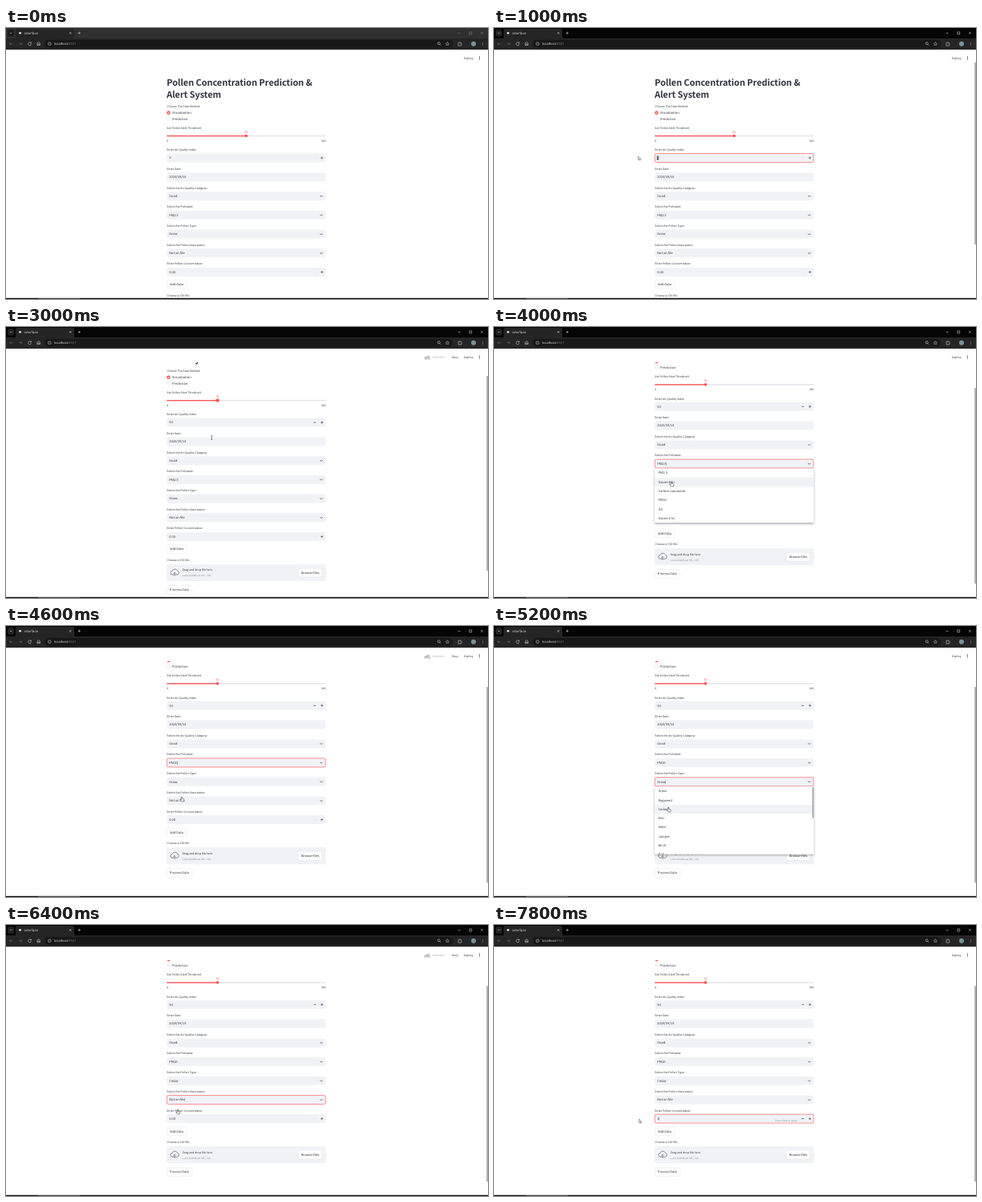
Write an HTML page that moves like this. It is 600 px wide and 338 px high and loops after 8000 ms.

```html
<!DOCTYPE html>
<html lang="en">
<head>
<meta charset="utf-8">
<title>interface</title>
<style>
  html, body { margin: 0; width: 100%; height: 100%; overflow: hidden; background: #fff; }
  svg { display: block; }
  text {
    font-family: "Noto Sans CJK JP", "Noto Sans CJK SC", "Noto Sans CJK", "Open Sans", sans-serif;
    text-rendering: geometricPrecision; white-space: pre;
  }
  .ui { font-family: "Open Sans", "Noto Sans", sans-serif; }
  .menu { filter: drop-shadow(0 1px 1.5px #0005); }
</style>
</head>
<body>
<svg id="stage" width="600" height="338" viewBox="0 0 600 338"></svg>
<script>
const LOOP = 8000, TICK = 200;
const INK = '#31333f', RED = '#ff4b4b', FIELD = '#f0f2f6', MUTED = '#8b8d96';
const ZOOM = 0.282, GLYPH = 1.12;   // page zoom, glyph size ratio of the font
const LEFT = 200, RIGHT = 398, ROW = 11.28;

const LISTS = {
  pollutant: ['PM2.5', 'Ozone 8-hr', 'Carbon monoxide', 'PM10', 'O3', 'Ozone 1-hr'],
  type: ['Grass', 'Ragweed', 'Cedar', 'Elm', 'Alder', 'Juniper', 'Birch', 'Oak'],
  desc: ['Not on file', 'Slight', 'Maple', 'Ragweed', 'Grass', 'Juniper', 'Moderate', 'Mulberry']
};
const SELECT_Y = { category: 209.7, pollutant: 233.3, type: 257.1, desc: 280.8 };

const START = {
  active: 0, bar: null, scroll: 0, run: '', limit: 50, drag: 0, focus: '', picked: 0, hint: 0,
  open: '', hover: 0, aqi: '0', category: 'Good', pollutant: 'PM2.5', type: 'Grass',
  desc: 'Not on file', conc: '0.00', cursor: null
};

// Each step changes part of the state and holds until the next.
const STEPS = [
  [200, { bar: [43, 270], cursor: ['beam', 232, 164] }],
  [400, { focus: 'aqi', cursor: ['beam', 206, 162] }],
  [600, { picked: 1, cursor: ['arrow', 179.6, 160] }],
  [1000, { active: 1 }],
  [1600, { aqi: '5', picked: 0, hint: 1 }],
  [1800, { aqi: '50' }],
  [2000, { hint: 0, run: 'bike', cursor: ['arrow', 240, 148] }],
  [2200, { focus: '', drag: 1, run: '', cursor: ['hand', 299, 135] }],
  [2400, { limit: 41, cursor: ['hand', 281, 135] }],
  [2600, { limit: 32, run: 'bike', cursor: ['hand', 264, 135] }],
  [2800, { scroll: 20, bar: [50, 290], cursor: ['beam', 258, 137] }],
  [3000, { scroll: 43, bar: [61, 304], cursor: ['beam', 256, 138] }],
  [3200, { scroll: 62.8, bar: [76, 320], drag: 0, cursor: ['arrow', 250, 146] }],
  [3400, { run: '', cursor: ['hand', 236, 164] }],
  [3600, { focus: 'pollutant', open: 'pollutant', cursor: ['hand', 226, 173] }],
  [3800, { cursor: ['hand', 222, 185] }],
  [4000, { hover: 1, cursor: ['hand', 221, 196] }],
  [4200, { hover: 2, cursor: ['hand', 220, 207] }],
  [4400, { hover: 3, cursor: ['hand', 219, 218] }],
  [4600, { open: '', pollutant: 'PM10', run: 'bike', cursor: ['hand', 219, 216] }],
  [4800, { run: 'runner', cursor: ['hand', 218, 197] }],
  [5000, { run: '', focus: 'type', open: 'type', hover: 0, cursor: ['hand', 218, 208] }],
  [5200, { hover: 2, cursor: ['hand', 217.5, 229] }],
  [5400, { open: '', type: 'Cedar', run: 'bike', cursor: ['hand', 217, 228] }],
  [5600, { run: 'runner', cursor: ['hand', 216, 220] }],
  [5800, { focus: 'desc', open: 'desc', hover: 0, cursor: ['hand', 215.8, 232] }],
  [6000, { run: '', hover: 1, cursor: ['hand', 215, 241] }],
  [6200, { hover: 0, cursor: ['hand', 215, 231] }],
  [6400, { open: '', run: 'bike', cursor: ['hand', 214, 233] }],
  [6600, { focus: 'conc', run: 'runner', cursor: ['beam', 212, 242] }],
  [6800, { picked: 1, cursor: ['arrow', 180.6, 242] }],
  [7200, { run: '' }],
  [7800, { conc: '2', picked: 0, hint: 1 }]
];

const stateAt = t => STEPS.reduce((s, [at, change]) => at <= t ? { ...s, ...change } : s, START);

const rect = (x, y, w, h, fill, extra = '') =>
  `<rect x="${x}" y="${y}" width="${w}" height="${h}" fill="${fill}" ${extra}/>`;
const dot = (x, y, r, fill, extra = '') => `<circle cx="${x}" cy="${y}" r="${r}" fill="${fill}" ${extra}/>`;
const line = (d, color, w = 0.6, extra = '') =>
  `<path d="${d}" fill="none" stroke="${color}" stroke-width="${w}" ${extra}/>`;

// Page text, centred on y; px is the unzoomed CSS size.
function text(x, y, s, px = 16, fill = INK, extra = '') {
  const size = px * ZOOM;
  return `<text x="${x}" y="${y + size * 0.31}" font-size="${size / GLYPH}" fill="${fill}" ${extra}>${s}</text>`;
}
const label = (y, s) => text(LEFT + 0.3, y, s, 14);
const uiText = (x, y, s, size, fill) =>
  `<text class="ui" x="${x}" y="${y}" font-size="${size}" fill="${fill}">${s}</text>`;

function button(x, y, w, s) {
  return rect(x, y - 5.4, w, 10.8, '#fff', 'rx="2" stroke="#d9dade" stroke-width=".35"') +
    text(x + w / 2, y, s, 16, INK, 'text-anchor="middle"');
}

function field(y, value, focused, picked) {
  const caret = focused && !picked ? '<tspan dx="-.5" font-weight="300">|</tspan>' : '';
  const border = focused ? `stroke="${RED}" stroke-width=".6"` : '';
  return rect(LEFT + 0.2, y - 5.5, RIGHT - LEFT - 0.4, 11, FIELD, `rx="2" ${border}`) +
    (picked ? rect(202.7, y - 2.5, value.length * 2.1 + 0.4, 5, '#4a4c55') : '') +
    text(203.2, y, value + caret, 16, picked ? '#fff' : INK);
}

function stepper(y, value, focused, s) {
  const live = parseFloat(value) > 0;
  return field(y, value, focused, focused && s.picked) +
    line(`M383 ${y}h2.8`, live ? INK : '#dcdee4', 0.65) +
    line(`M391.8 ${y}h2.8M393.2 ${y - 1.4}v2.8`, INK, 0.65) +
    (focused && s.hint
      ? text(377.7, y + 2.8, 'Press Enter to apply', 12, MUTED, 'text-anchor="end"') : '');
}

function select(key, name, s) {
  const y = SELECT_Y[key];
  return label(y - 10.4, name) + field(y, s[key], s.focus === key, false) +
    line(`M391 ${y - 0.7}l1.5 1.5l1.5 -1.5`, INK, 0.75);
}

function radio(y, name, on) {
  return (on
    ? dot(202.4, y, 2.2, RED) + dot(202.4, y, 0.85, '#fff')
    : dot(202.4, y, 2, '#fff', 'stroke="#d0d2d9" stroke-width=".4"')) + text(207, y, name);
}

function slider(s) {
  const y = 134.6, x = LEFT + (RIGHT - LEFT) * s.limit / 100;
  return label(124.5, 'Set Pollen Alert Threshold') +
    rect(LEFT, y - 0.6, RIGHT - LEFT, 1.2, '#dfe1e7', 'rx=".6"') +
    rect(LEFT, y - 0.6, x - LEFT, 1.2, RED, 'rx=".6"') +
    (s.drag ? dot(x, y, 2.6, RED, 'opacity=".4"') : '') + dot(x, y, 1.75, RED) +
    text(x, 129.8, s.limit, 14, RED, 'text-anchor="middle"') +
    text(LEFT + 0.3, 140.6, '0', 14) + text(RIGHT, 140.6, '100', 14, INK, 'text-anchor="end"');
}

function uploader() {
  const y = 349.4;
  return label(333.7, 'Choose a CSV file') +
    rect(LEFT, y - 10.7, RIGHT - LEFT, 21.4, FIELD, 'rx="2"') +
    line(`M207.2 ${y + 2.6}a2.4 2.4 0 0 1 -.2 -4.8a3.4 3.4 0 0 1 6.3 -.3a2.6 2.6 0 0 1 -.4 5.1z` +
      `M209.8 ${y + 4}v-4.4m-1.5 1.5l1.5 -1.5l1.5 1.5`, '#70727c', 0.75) +
    text(219.5, y - 3.2, 'Drag and drop file here', 14) +
    text(219.5, y + 4, 'Limit 200MB per file • CSV', 12, MUTED) +
    button(364, y, 29.5, 'Browse files');
}

function menu(s) {
  if (!s.open) return '';
  const items = LISTS[s.open], top = SELECT_Y[s.open] + 5.9, w = RIGHT - LEFT;
  const h = Math.min(items.length * ROW, 84.5);
  const rows = items.map((name, i) =>
    (i === s.hover ? rect(0, i * ROW, w, ROW, FIELD) : '') + text(4.5, (i + 0.5) * ROW, name)).join('');
  const thumb = items.length * ROW > h
    ? rect(w - 1.6, 0.8, 1.3, s.open === 'type' ? 38.5 : 28, '#8f8f8f', 'rx=".6"') : '';
  return rect(LEFT, top, w, h, '#fff', 'class="menu" rx="1"') +
    `<svg x="${LEFT}" y="${top}" width="${w}" height="${h}">${rows}${thumb}</svg>`;
}

function page(s) {
  const title = (y, t) => `<text x="200" y="${y}" font-size="10.98" font-weight="700" ` +
    `letter-spacing="-.06" fill="${INK}">${t}</text>`;
  return `<g transform="translate(0 ${-s.scroll})">` +
    title(71.5, 'Pollen Concentration Prediction &amp;') + title(86.5, 'Alert System') +
    label(97.5, 'Choose The Data Method') +
    radio(105.8, 'Visualization', true) + radio(113.2, 'Prediction', false) +
    slider(s) +
    label(152.2, 'Enter Air Quality Index') + stepper(162, s.aqi, s.focus === 'aqi', s) +
    label(175.8, 'Enter Date') + field(185.9, '2024/09/10', false, false) +
    select('category', 'Select the Air Quality Category:', s) +
    select('pollutant', 'Select the Pollutant:', s) +
    select('type', 'Select the Pollen Type:', s) +
    select('desc', 'Select the Pollen Description:', s) +
    label(294.1, 'Enter Pollen Concentration:') + stepper(304.4, s.conc, s.focus === 'conc', s) +
    button(200.2, 320.1, 24.4, 'Add Data') + uploader() + button(200.2, 370.8, 31.3, 'Process Data') +
    menu(s) + '</g>';
}

const RUN_ICONS = {
  bike: 'M521.2 39a1.4 1.4 0 1 0 2.8 0a1.4 1.4 0 1 0 -2.8 0M525.2 39a1.4 1.4 0 1 0 2.8 0' +
    'a1.4 1.4 0 1 0 -2.8 0M522.6 39l1.4 -2.2l1.4 1.3v1.4M524 36.8l1.6 -1.2l1 1.2h1',
  runner: 'M525.4 34.6l.6 .2M525.2 35.8l-1 2.2l1.5 1.1l-.2 1.7M524.2 38l-.8 1.4l-1.6 .6' +
    'M523 37l.8 -1.2l1.4 0l1 1.2l1.2 -.3'
};

function header(s) {
  let out = rect(0, 27, 600, 17, '#fff') + text(570, 37.5, 'Deploy', 14);
  for (const y of [35.9, 37.5, 39.1]) out += dot(589.4, y, 0.55, INK);
  if (s.run) {
    out += line(RUN_ICONS[s.run], '#7c7e88', 0.6) +
      text(530.5, 37.5, 'RUNNING...', 13, '#a6a8b0') + text(555, 37.5, 'Stop', 14);
  }
  return out;
}

function browser(s) {
  const strip = s.active ? '#050505' : '#303030', tool = '#252525';
  const ctl = s.active ? '#e8e8e8' : '#8a8a8a', icon = '#d2d2d2', dim = '#707070';
  let out = rect(0, 0, 600, 14, strip) + rect(0, 13, 600, 14, tool) +
    `<path d="M10.5 13q1.5 0 1.5 -1.5V3q0 -2 2 -2H83q2 0 2 2v8.5q0 1.5 1.5 1.5z" fill="${tool}"/>` +
    rect(2, 2, 8, 8.6, s.active ? '#222' : '#1c1c1c', 'rx="2.2"') +
    line('M4.8 5.7l1.3 1.3l1.3 -1.3', icon) +
    rect(16, 5.3, 3, 2, '#e6e6e6') + uiText(22.5, 7.8, 'interface', 4.2, '#e6e6e6') +
    line('M78.9 5.1l2.4 2.4m0 -2.4l-2.4 2.4M89.6 6.3h3.2m-1.6 -1.6v3.2', icon) +
    line('M562.6 6.4h3M576.8 4.9h2.9v2.9h-2.9zM591 4.9l2.8 2.8m0 -2.8l-2.8 2.8', ctl, 0.5) +
    rect(48, 14.8, 508, 10, '#181818', 'rx="5"');
  out += line('M8.4 19.7h-3.8m1.7 -1.7l-1.7 1.7l1.7 1.7M16.2 19.7h3.8m-1.7 -1.7l1.7 1.7l-1.7 1.7', dim) +
    line('M31 18.6a1.9 1.9 0 1 0 .4 1.6M31.4 17.5v1.4h-1.4M38.9 21.6v-2.7l1.7 -1.4l1.7 1.4v2.7h-1.1v-1.6h-1.2v1.6z', icon) +
    dot(54.2, 19.7, 1.9, 'none', `stroke="${icon}" stroke-width=".5"`) +
    line('M54.2 19.4v1.3M54.2 18.5v.5', icon, 0.5) +
    uiText(60, 21.2, 'localhost:<tspan fill="#777">8501</tspan>', 4.1, '#e8e8e8') +
    dot(538.8, 19.3, 1.5, 'none', `stroke="${icon}" stroke-width=".6"`) + line('M540 20.5l1.3 1.3', icon) +
    line('M549.5 17.6l.6 1.5l1.6 .1l-1.2 1l.4 1.6l-1.4 -.9l-1.4 .9l.4 -1.6l-1.2 -1l1.6 -.1z', icon, 0.45) +
    line('M563.1 18.4h1.1a.7 .7 0 1 1 1.4 0h1.1v1.2a.7 .7 0 1 1 0 1.4v1h-3.6z', icon) +
    dot(582, 19.7, 3, '#78929a');
  for (const y of [18.1, 19.7, 21.3]) out += dot(593.3, y, 0.45, icon);
  return out + rect(0, 336.8, 600, 1.2, '#0a0a0a') + rect(40, 337, 52, 1, '#444');
}

const CURSORS = {
  arrow: '<path d="M0 0V4.6L1.1 3.6L1.9 5.3L2.6 5L1.9 3.4H3.3Z" fill="#fff" stroke="#333" stroke-width=".45"/>',
  beam: line('M-.9 -2.4h1.8M0 -2.4v4.8M-.9 2.4h1.8', '#333', 0.55),
  hand: '<path d="M-.9 -2.8q.6 -.6 1 0v2l2 .5q.6 .2 .5 1l-.5 2.2h-2.6l-1.9 -2.4q.2 -.7 1.5 .2z" ' +
    'fill="#fff" stroke="#222" stroke-width=".5" stroke-linejoin="round"/>'
};

function pointer([kind, x, y]) {
  return `<g transform="translate(${x} ${y})">${CURSORS[kind]}</g>`;
}

function scene(s) {
  const bar = s.bar ? rect(598.4, s.bar[0], 1.3, s.bar[1] - s.bar[0], '#8b8b8b', 'rx=".6"') : '';
  return rect(0, 0, 600, 338, '#fff') + page(s) + header(s) + bar + browser(s) +
    (s.cursor ? pointer(s.cursor) : '');
}

const stage = document.getElementById('stage');
let shown = -1;
function draw() {
  const tick = Math.floor(performance.now() % LOOP / TICK);
  if (tick !== shown) {
    shown = tick;
    stage.innerHTML = scene(stateAt(tick * TICK));
  }
  requestAnimationFrame(draw);
}
draw();
</script>
</body>
</html>
```
